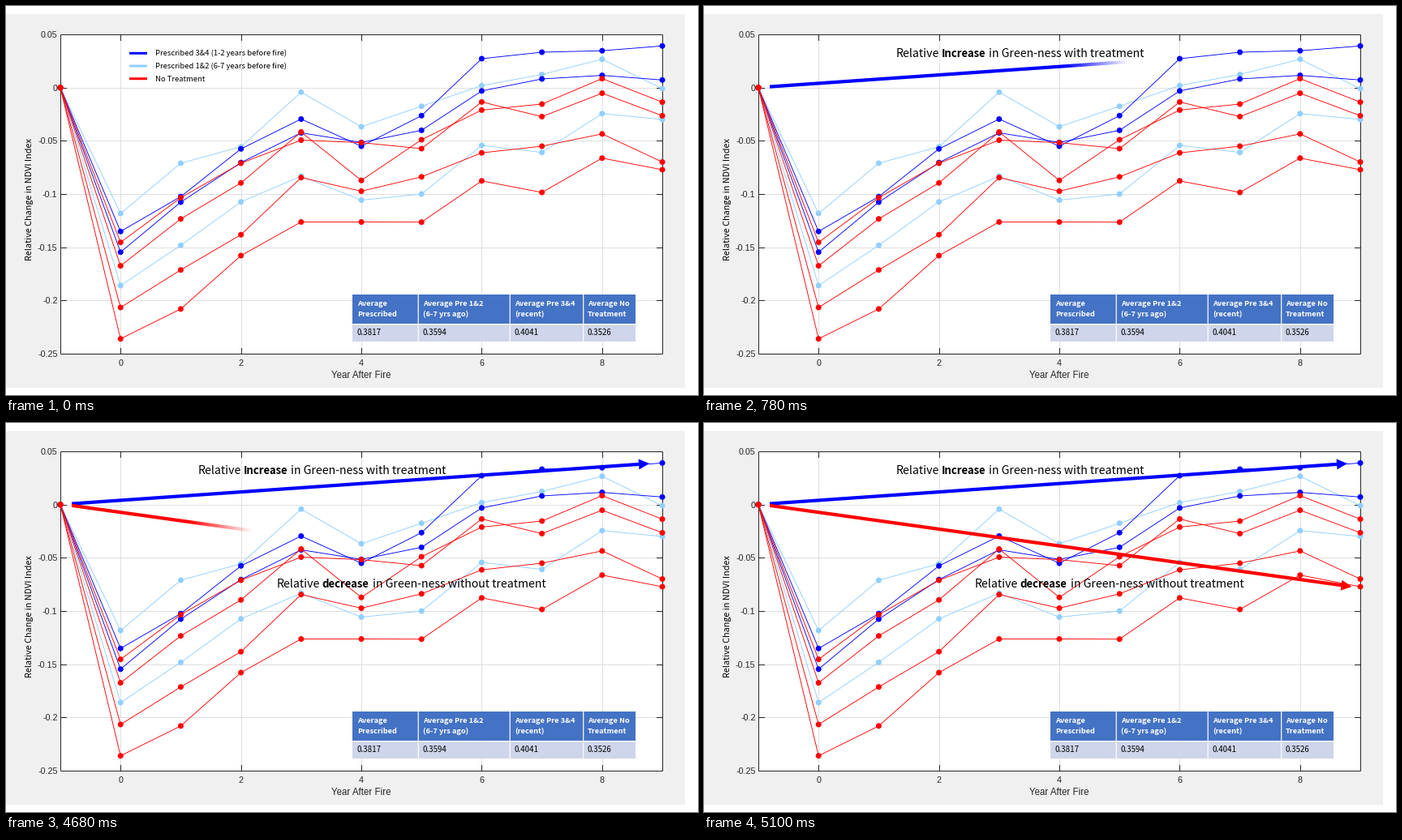
Write a matplotlib script that moves like this. It is 853 px wide and 480 px high and loops after 7.78 s.

```python
import numpy as np
import matplotlib.pyplot as plt
from matplotlib.animation import FuncAnimation
from matplotlib.collections import LineCollection, PolyCollection
from matplotlib.colors import to_rgb
from matplotlib.patches import Polygon, Rectangle

W, H, DPI = 853, 480, 64
LOOP, TICK = 7780, 20          # ms
STEP, WIPE = 70, 500           # ms
RISE_AT, FALL_AT = 500, 4540   # ms
SOFT = 0.11                    # soft edge of the wipe, share of the arrow length

PT = 72 / DPI                  # points per pixel
SANS, HUMAN = "Liberation Sans", "Noto Sans CJK JP"
BLUE, SKY, RED, DARK = "#0000ff", "#91cfff", "#ff0000", "#262626"
LEFT, RIGHT, TOP, BOTTOM = 67.5, 809.5, 35.5, 429.5

fig = plt.figure(figsize=(W / DPI, H / DPI), dpi=DPI, facecolor="white")
ax = fig.add_axes([0, 0, 1, 1])
ax.set_xlim(0, W)
ax.set_ylim(H, 0)
ax.axis("off")


def box(x0, y0, x1, y1, color, z=0):
    ax.add_patch(Rectangle((x0, y0), x1 - x0, y1 - y0, fc=color, lw=0,
                           zorder=z, snap=False))


def strokes(segments, color, width=1, z=1):
    lines = LineCollection(segments, colors=color, linewidths=width * PT,
                           zorder=z, snap=False)
    return ax.add_collection(lines, autolim=False)


def label(x, y, text, size, font=HUMAN, color="black", **kw):
    kw = {"va": "baseline", "zorder": 9, **kw}
    return ax.text(x, y, text, fontsize=size * PT, family=font, color=color, **kw)


def col(year):
    return 67 + 74.2 * (year + 1)


def row(value):
    return 101.1 - 1313 * value


def draw_axes():
    box(0, 10, 837, 471, "#f0f0f0")
    box(LEFT, TOP, RIGHT, BOTTOM, "white")
    grid, ticks = [], []
    for year in range(0, 10, 2):
        x = np.floor(col(year) + 0.5) + 0.5
        grid.append([(x, TOP), (x, BOTTOM)])
        ticks += [[(x, TOP), (x, TOP + 7.5)], [(x, BOTTOM - 7.5), (x, BOTTOM)]]
        label(col(year), 444, str(year), 10.8, SANS, DARK, ha="center")
    for i in range(7):
        value = 0.05 - 0.05 * i
        y = np.floor(row(value)) + 0.5
        if 0 < i < 6:
            grid.append([(LEFT, y), (RIGHT, y)])
            ticks += [[(LEFT, y), (LEFT + 7.5, y)], [(RIGHT - 7.5, y), (RIGHT, y)]]
        name = "0" if i == 1 else f"{value:.2f}".rstrip("0")
        label(63.6, y + 3.4, name, 10.8, SANS, DARK, ha="right")
    strokes(grid, "#dfdfdf")
    frame = [(LEFT, TOP), (RIGHT, TOP), (RIGHT, BOTTOM), (LEFT, BOTTOM), (LEFT, TOP)]
    strokes(ticks + list(zip(frame, frame[1:])), DARK, z=2)
    label(438.2, 459, "Year After Fire", 11.5, SANS, DARK, ha="center")
    label(34.4, 239, "Relative Change in NDVI Index", 10.8, weight="medium",
          rotation=90, ha="right", va="center")


# Heights in pixels for years 0 to 9; every curve starts at zero change.
CURVES = [
    (SKY, [256, 194, 173.7, 106.3, 149, 123.7, 98.2, 84.5, 65.7, 102]),
    (SKY, [345, 295.3, 241.7, 210, 239.5, 232, 172, 180.7, 132.8, 140]),
    (BLUE, [278.2, 235.2, 176.3, 139.5, 173, 135.3, 65, 57, 55.2, 49.3]),
    (BLUE, [303.7, 242, 193.2, 156.5, 168.3, 153.4, 104.8, 90, 85.6, 91.3]),
    (RED, [291.6, 236.6, 194, 165.5, 168.6, 176, 118.4, 136.5, 107.6, 135.4]),
    (RED, [320.6, 262.7, 218.3, 155.5, 215.2, 165, 128.4, 121, 89.6, 118.6]),
    (RED, [372, 325.7, 282.2, 211.7, 228.5, 210.8, 181.2, 173, 157.8, 192.5]),
    (RED, [410.7, 373.8, 308, 266.5, 266.5, 266.7, 215.8, 230, 187.7, 202]),
]


def draw_curves():
    x = col(np.arange(-1, 10))
    # One size per dot keeps the dots at sub-pixel positions.
    sizes = np.full(len(x), (7 * PT) ** 2)
    for color, ys in CURVES:
        ys = [100.7] + ys
        ax.plot(x, ys, color=color, lw=0.9 * PT, zorder=3)
        ax.scatter(x, ys, s=sizes, color=color, lw=0, zorder=3)


def draw_table():
    box(427, 356, 776, 392, "#4472c4", 4)
    box(427, 392, 776, 393.5, "white", 4)
    box(427, 393.5, 776, 414, "#cfd5ea", 4)
    strokes([[(x, 356), (x, 414)] for x in (508.2, 621.2, 711.7)], "white", 1.2, 5)
    cells = [
        (433, "Average", "Prescribed", "0.3817"),
        (514, "Average Pre 1&2", "(6-7 yrs ago)", "0.3594"),
        (627, "Average Pre 3&4", "(recent)", "0.4041"),
        (717, "Average No", "Treatment", "0.3526"),
    ]
    for x, first, second, value in cells:
        label(x, 370.3, first, 9.2, color="white", weight="bold")
        label(x, 383, second, 9.2, color="white", weight="bold")
        label(x, 406, value, 9.7)


def make_legend():
    rows = [
        (58.3, BLUE, "Prescribed 3&4 (1-2 years before fire)"),
        (74, SKY, "Prescribed 1&2 (6-7 years before fire)"),
        (89.7, RED, "No Treatment"),
    ]
    parts = []
    for y, color, text in rows:
        parts.append(strokes([[(152, y), (174, y)]], color, 3, 5))
        parts.append(label(184.5, y + 3.1, text, 9.4, weight="medium"))
    return parts


def make_caption(y, *runs):
    size = {"normal": 14.1, "bold": 13.1}
    return [label(x, y, text, size[weight], weight=weight) for x, text, weight in runs]


class Arrow:
    """An arrow that is wiped in from the left behind a soft edge."""

    def __init__(self, start, tip, color, z):
        start, tip = np.array(start), np.array(tip)
        self.rgb = to_rgb(color)
        self.x0, self.span = start[0], tip[0] - start[0]
        along = (tip - start) / np.hypot(*(tip - start))
        across = np.array([-along[1], along[0]])
        base = tip - 13 * along

        x = np.append(np.arange(start[0], base[0], 3), base[0] + 1)
        y = start[1] + (x - start[0]) * along[1] / along[0]
        half = 2.1 / along[0]
        quads = [[(a, c - half), (b, d - half), (b, d + half), (a, c + half)]
                 for a, b, c, d in zip(x, x[1:], y, y[1:])]
        self.mid = (x[1:] + x[:-1]) / 2
        self.head_x = (base[0] + tip[0]) / 2
        self.shaft = PolyCollection(quads, linewidths=0, edgecolors="none", zorder=z)
        ax.add_collection(self.shaft, autolim=False)
        self.head = Polygon([tip, base + 6.5 * across, base - 6.5 * across],
                            fc=color, lw=0, zorder=z)
        ax.add_patch(self.head)

    def wipe(self, p):
        lead = self.x0 + self.span * p * (1 + SOFT)

        def fade(x):
            return np.clip((lead - x) / (SOFT * self.span), 0, 1)

        rgba = np.empty((len(self.mid), 4))
        rgba[:, :3] = self.rgb
        rgba[:, 3] = fade(self.mid)
        self.shaft.set_facecolor(rgba)
        self.head.set_alpha(float(fade(self.head_x)))
        self.shaft.set_visible(p > 0)
        self.head.set_visible(p > 0)


draw_axes()
draw_curves()
draw_table()
legend = make_legend()
rise_text = make_caption(63.3, (237, "Relative", "normal"), (292.5, "Increase", "bold"),
                         (351, "in Green-ness with treatment", "normal"))
fall_text = make_caption(203.3, (334, "Relative", "normal"), (389.5, "decrease", "bold"),
                         (452, "in Green-ness without treatment", "normal"))
rise = Arrow((81, 99.6), (793, 50), BLUE, 6)
fall = Arrow((81, 101.8), (798.5, 202), RED, 7)


def show(parts, on):
    for part in parts:
        part.set_visible(on)


def progress(t, begin):
    return min(max((t - begin) // STEP * STEP / WIPE, 0), 1)


def update(i):
    t = i * TICK
    show(legend, t < RISE_AT)
    show(rise_text, t >= RISE_AT)
    show(fall_text, t >= FALL_AT)
    rise.wipe(progress(t, RISE_AT))
    fall.wipe(progress(t, FALL_AT))
    return []


anim = FuncAnimation(fig, update, frames=LOOP // TICK, interval=TICK,
                     init_func=lambda: update(0), repeat=True, repeat_delay=0)
plt.show()
```
